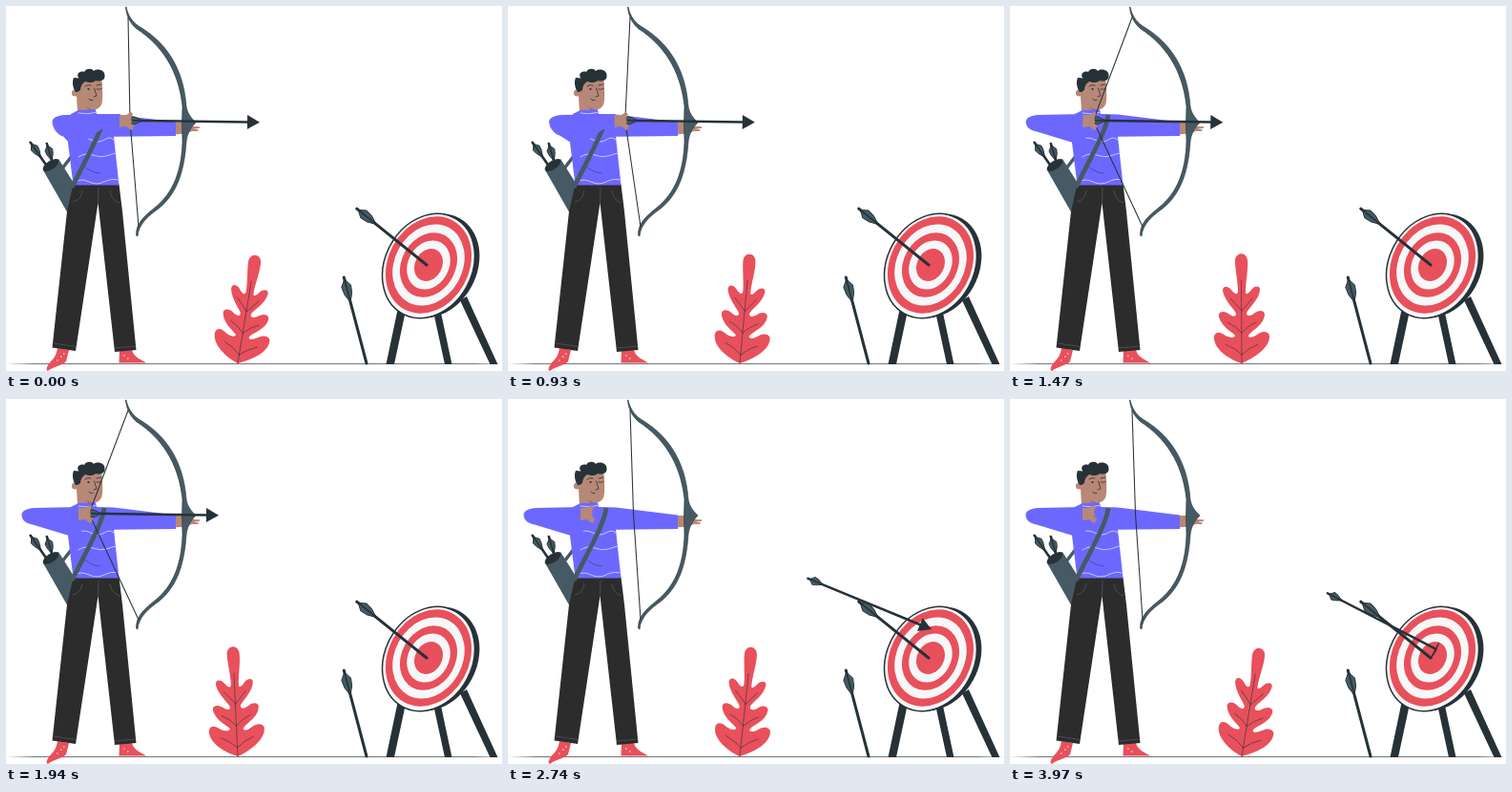
Recreate the animation shown at these times as an HTML page. Size 520x382 px, loop 4.43 s.

```html
<!DOCTYPE html>
<html lang="en">
<head>
<meta charset="utf-8">
<title>Archer</title>
<style>
  html, body { margin: 0; width: 100%; height: 100%; overflow: hidden; background: #fff; }
  svg { display: block; width: 520px; height: 382px; }
  .dark { fill: #263238; }
  .slate { fill: #455a64; }
  .red { fill: #e8505b; }
  .skin { fill: #b78876; }
  .knit { fill: #6c68ff; }
  .line { fill: none; stroke: #263238; stroke-width: .8; stroke-linecap: round; }
  .wave { fill: none; stroke: #d0cfff; stroke-width: .9; stroke-linecap: round; }
  .seam { fill: none; stroke: #5c6468; stroke-width: .6; }
</style>
</head>
<body>
<svg viewBox="0 0 520 382">
  <clipPath id="face"><path d="M-20-112H640L447 262 383 387H-20Z"/></clipPath>

  <path d="M0 374.500L30 374H490L520 374.500 490 375H30Z" fill="#6f767a"/>

  <g id="plant">
    <path class="red" d="M243 374C228 369 213 358 214 346C215 340 221 341 226 345C230 347 235 348 236 345C235 342 222 337 219 325C218 319 225 319 229 322C233 325 237 326 237 322C236 318 225 309 223 298C223 292 229 293 232 297C235 301 238 303 239 299C239 288 236 276 236 266C237 257 248 257 249 266C250 276 247 288 247 299C247 303 250 301 253 297C256 293 262 292 262 297C261 308 250 316 248 321C248 326 253 324 257 321C261 318 267 318 267 323C266 335 252 340 250 345C250 348 255 347 259 344C264 340 271 340 272 345C273 357 257 368 243 374Z"/>
    <path class="line" stroke-opacity=".7" d="M243 374L242.500 287M243 365Q236 358 226 354M243 365Q250 358 260 354M243 342Q237 335 228 331M243 342Q249 335 258 331M243 319Q237 312 231 306M243 319Q249 312 254 306"/>
  </g>

  <!-- target -->
  <path class="dark" d="M410.500 318L419 319 407 375H398.500ZM448.500 322L456 321 467.500 375H460ZM476 308L483 304 515.500 375H507.500Z"/>
  <g id="target"></g>
  <g id="stuck"></g>

  <!-- quiver -->
  <path d="M59 170L69 157" stroke="#455a64" stroke-width="3.500"/>
  <g id="spare"></g>
  <path class="slate" d="M38.500 171L55 160 74 190 66 219Z"/>
  <ellipse class="dark" cx="47" cy="166.500" rx="9.500" ry="4.500" transform="rotate(-33 47 166.500)"/>

  <!-- legs -->
  <path class="red" d="M54 358L66 360 63 372C58 377 50 377 44 382C41 381 43 376 48 371C51 368 53 364 54 358ZM119 360L132 360C134 368 142 370 147 373.500H118.500Z"/>
  <path d="M57 367h1.500M53 371h1.500M60 364h1.500M123 366h1.500M127 369h1.500" stroke="#fff" stroke-width="1.200"/>
  <path fill="#2c2c2c" d="M70.500 186.500H118.500L122 215 136.500 360 114 362 96.500 206 73 361 48.500 357.500 64 215Z"/>
  <path class="seam" d="M97 190L96.500 206M70 205Q79 203 80 193M119 206Q110 203 109 193M50 353L73.500 356.500M114 358L136 356"/>

  <!-- head -->
  <path class="skin" d="M76 78H100.500C101 86 102 96 100.500 102C98 109 92 109 90 107.500L94 112H75L74 94Z"/>
  <circle class="skin" cx="72.500" cy="91" r="3.600"/>
  <path d="M84 105Q88 109 94 108L93 110Q86 111 84 105Z" fill="#9a6a5b"/>
  <path class="dark" d="M73 90C70 86 69 79 71 75L76.500 75.500C73 72 77 67 82 69C84 65 90 65 92 68C96 65 104 67 103.500 73C104 78 98 79.500 94 78C91 81 86 80 83 79C80 81 78 84 78 88L75 90Z"/>
  <path class="line" d="M83 84Q86 81.500 89 83M95 83L100 82M95 87Q98 88 100 86.500M92.500 86L95 94 92 95M87 97.500Q89 99.500 91 98.500"/>
  <circle class="dark" cx="86.500" cy="87" r="1.100"/>

  <!-- torso and front arm -->
  <path class="skin" d="M176 122H188L196 126 203 126.200 203 128 197 128.600 202 129.600 201 131 195 131 188 133.500 176 134.500Z"/>
  <path class="knit" d="M76 109L94 108.500 95 113 113 113.500 178 121.500V136L113 136.800 118.500 187.500H70.500L65 143 68 113Z"/>
  <path class="wave" d="M76 112Q85 114 94 111.500M74 140Q81 136 89 140T103 140T113 140M76 158Q83 153 91 156T105 157T115 154M72 184Q79 180 87 184T103 184T117 182"/>
  <path class="line" d="M81 167Q88 174 98 175" stroke-opacity=".6"/>
  <path d="M103 114C101 130 88 152 69 190" fill="none" stroke="#455a64" stroke-width="4.800"/>

  <path id="sleeve" class="knit"/>
  <path class="slate" stroke="#263238" stroke-width=".6" d="M126 1C128 10 132 16 139 21C165 36 186 62 189 105C190 112 194 117 199 122C193 128 190 134 189 142C187 172 180 196 160 212C150 219 139 228 138 241L136.500 240C136 227 146 219 156 211C176 195 184 172 185 142L184.500 122 185 105C181 66 162 40 137 24C130 18 126 10 125.500 1Z"/>
  <path id="string" class="line" style="stroke-width:1.050"/>
  <g clip-path="url(#face)"><g id="shot"></g></g>
  <path id="barb" class="line" style="stroke-width:1.500" d="M447 262L441.500 270.500"/>
  <path id="hand" class="skin" d="M0 1H7L12-2 14 0 12 5 13 8 12 10 15 12 14 16 12 17 7 13 0 14Z"/>
</svg>
<script>
const LOOP = 4430;
const $ = id => document.getElementById(id);
const lerp = (a, b, k) => a + (b - a) * k;
const clamp = k => Math.max(0, Math.min(1, k));
const easeInOut = k => k < .5 ? 4 * k ** 3 : 1 - 4 * (1 - k) ** 3;

// An arrow along +x with its nock at 0,0.
function arrow(length, fletch, half, width, head) {
  const end = head ? length - 12 : length;
  return `<path d="M1 0H${end}" stroke="#263238" stroke-width="${width}" stroke-linecap="round"/>` +
    `<path class="slate" stroke="#263238" stroke-width=".9" d="M3 0L${3 + fletch * .3} ${-half}L${fletch * .75} ${-half * .8}L${fletch + 3} 0L${fletch * .75} ${half * .8}L${3 + fletch * .3} ${half}Z"/>` +
    `<path d="M1 0H${fletch + 3}" stroke="#263238" stroke-width="1.600"/>` +
    (head ? `<path class="dark" d="M${length} 0L${length - 13}-7.500V7.500Z"/>` : '');
}

function placed(x, y, x2, y2, fletch, half, width) {
  const turn = Math.atan2(y2 - y, x2 - x) * 180 / Math.PI;
  const length = Math.hypot(x2 - x, y2 - y);
  return `<g transform="translate(${x} ${y}) rotate(${turn})">${arrow(length, fletch, half, width)}</g>`;
}

const disc = (x, y, scale, fill, extra = '') =>
  `<ellipse rx="${45.5 * scale}" ry="${57 * scale}" fill="${fill}" ${extra} transform="translate(${x} ${y}) rotate(29)"/>`;

$('target').innerHTML =
  disc(448, 272, 1, '#263238') +
  disc(443, 272, 1, '#f7f7f7', 'stroke="#263238" stroke-width="1.500"') +
  [.93, .78, .62, .47, .31].map((s, i) => disc(443, 271, s, i % 2 ? '#f7f7f7' : '#e8505b')).join('');
$('stuck').innerHTML =
  placed(367, 211.5, 441, 271, 24, 5, 3) + placed(354, 283, 378, 374, 25, 5, 3);
$('spare').innerHTML =
  placed(25, 142, 46, 172, 17, 4, 2.6) + placed(42.5, 143, 50, 168, 17, 4, 2.6);
$('shot').innerHTML = arrow(141, 15, 4.2, 2.5, true);

// Time and x of the plant's tip.
const sway = [[570, 261], [930, 253], [1470, 242], [1900, 237], [2400, 248],
  [2740, 254.5], [3270, 261.7], [3620, 262.3], [3970, 261]];

function slope(i) {
  const a = sway[i - 1], b = sway[i + 1];
  return a && b ? (b[1] - a[1]) / (b[0] - a[0]) : 0;
}

function tipX(t) {
  if (t <= sway[0][0] || t >= sway.at(-1)[0]) return 261;
  const i = sway.findIndex(p => p[0] > t) - 1;
  const [t0, a] = sway[i], [t1, b] = sway[i + 1];
  const d = t1 - t0, k = (t - t0) / d, k2 = k * k, k3 = k2 * k;
  return (2 * k3 - 3 * k2 + 1) * a + (k3 - 2 * k2 + k) * d * slope(i) +
    (3 * k2 - 2 * k3) * b + (k3 - k2) * d * slope(i + 1);
}

function draw(t) {
  const pull = easeInOut(clamp((t - 580) / 1010));
  const fly = clamp((t - 2190) / 595);
  const wrist = lerp(119, 76, pull);
  const e = lerp(48, 16, pull);
  const sag = lerp(5, 0, pull);
  const nock = lerp(wrist + 6, 332, fly);
  const drop = fly * (fly - .38);

  $('plant').setAttribute('transform',
    `rotate(${Math.asin((tipX(t) - 242) / 113) * 180 / Math.PI} 243 374)`);
  $('sleeve').setAttribute('d',
    `M${wrist + 1} 113L${e + 14} 114C${e + 4} 114.500 ${e} 118 ${e + .5} 122` +
    `C${e + 1} 128 ${e + 6} ${130 + sag} ${e + 12} ${131.5 + sag}L66 143H80L${Math.min(100, wrist + 1)} 129L${wrist + 1} 127.500Z`);
  $('hand').setAttribute('transform', `translate(${wrist} 113)`);
  $('string').setAttribute('d', `M128 12L${Math.min(131.5, nock + 5)} 120L139 231`);
  $('shot').setAttribute('transform',
    `translate(${nock} ${119.7 + 134 * drop}) rotate(${.8 + 42.6 * drop})`);
  $('barb').style.display = fly < 1 ? 'none' : '';
}

const start = performance.now();
function tick() {
  draw((performance.now() - start) % LOOP);
  requestAnimationFrame(tick);
}
tick();
</script>
</body>
</html>
```
